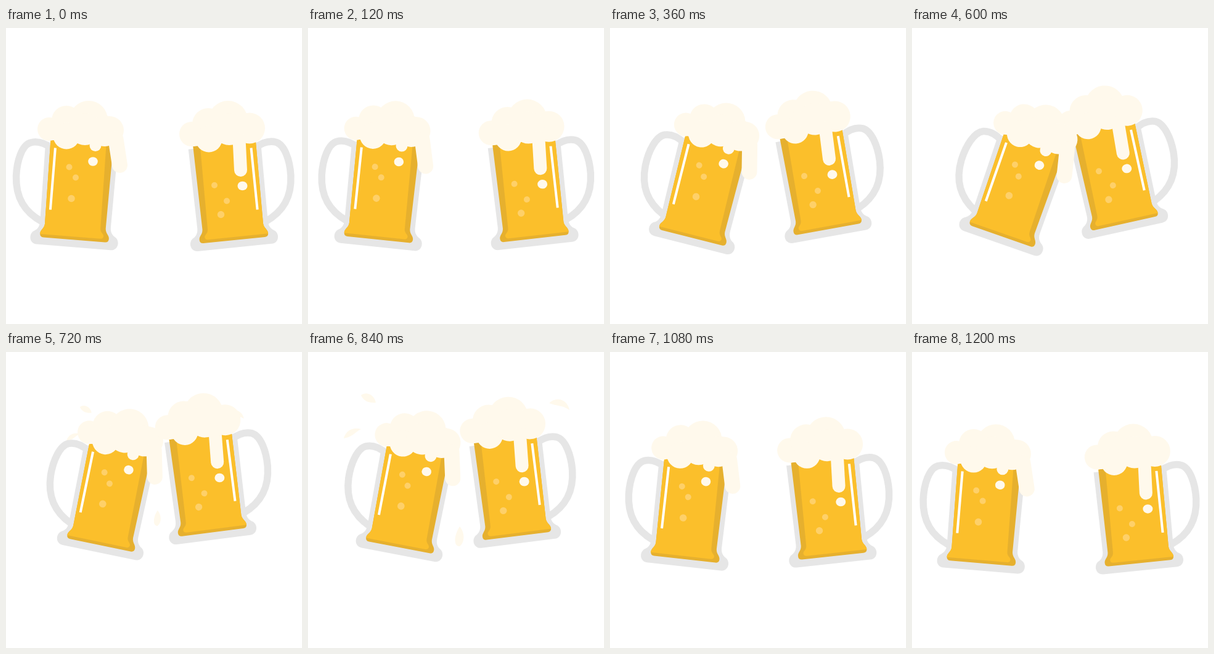
Write an HTML page that moves like this. It is 480 px wide and 480 px high and loops after 1.26 s.

```html
<!DOCTYPE html>
<html lang="en">
<head>
<meta charset="utf-8">
<title>Cheers</title>
<style>
  html, body { margin: 0; width: 100%; height: 100%; overflow: hidden; background: #fff; }
  svg { display: block; width: 100vw; height: 100vh; }
  .foam { fill: #fff9ec; }
  .drip { stroke: #fff9ec; stroke-linecap: round; }
  .bubbles { fill: #fed069; }
</style>
</head>
<body>
<svg viewBox="0 0 480 480">
  <defs>
    <!-- upright mug around its own centre, handle on the left -->
    <g id="body">
      <path fill="none" stroke="#e6e6e6" stroke-width="11.5"
        d="M-50-66C-62-73-74-75-84-71C-97-65-103-40-102-15C-100 20-84 42-54 55"/>
      <path fill="#e6e6e6" d="M-59-74H59L57.5 55C57.5 64 62 68 65 70C75 75 73 92 60 92H-60C-73 92-75 75-65 70C-62 68-57.5 64-57.5 55Z"/>
      <path fill="#e6b02e" d="M-51-78H51L49.5 58C50 66 56 68 56 74Q56 80 50 80H-50Q-56 80-56 74C-56 68-50 66-49.5 58Z"/>
      <path fill="#fbbf2b" d="M-51-78H39.5L41 58C41 65 46 66 47 70Q47 75 42 75H-56C-56 68-50 66-49.5 58Z"/>
      <path stroke="#fff" stroke-width="4" d="M-42.5-66V34.5"/>
    </g>
  </defs>

  <g id="splash" class="foam">
    <path d="M58 140C62 126 74 122 86 125C76 130 72 138 58 140"/>
    <path d="M86 70C94 64 107 68 110 82C100 83 90 80 86 70"/>
    <path d="M391 83C402 72 420 76 424 94C412 86 404 88 391 83"/>
    <path d="M246 283C254 292 255 308 246 315C236 316 236 298 246 283"/>
  </g>

  <g id="right">
    <use href="#body" transform="scale(-1 1)"/>
    <g transform="rotate(5.8) translate(-361.9 -264.4)">
      <g class="bubbles">
        <circle cx="338" cy="255" r="5"/><circle cx="358" cy="280.5" r="5"/><circle cx="348.5" cy="302.5" r="5.7"/>
      </g>
      <g class="foam">
        <circle cx="301" cy="172" r="20"/><circle cx="328" cy="156" r="26"/>
        <circle cx="360" cy="150" r="32"/><circle cx="395" cy="162.5" r="25"/>
        <circle cx="329" cy="180" r="21.5"/><circle cx="362" cy="164" r="26"/>
        <path class="drip" stroke-width="21" d="M378 180L380.5 230.5"/>
        <ellipse cx="383.5" cy="256" rx="8" ry="7.3"/>
      </g>
    </g>
  </g>

  <g id="left">
    <use href="#body"/>
    <g transform="rotate(-4.6) translate(-117 -263.7)">
      <g class="bubbles">
        <circle cx="102.5" cy="225.5" r="5"/><circle cx="113" cy="242.5" r="5"/><circle cx="106" cy="276.5" r="5.8"/>
      </g>
      <g class="foam">
        <circle cx="70" cy="164" r="19"/><circle cx="98" cy="150" r="24"/>
        <circle cx="134" cy="149" r="31"/><circle cx="168" cy="166" r="23"/>
        <circle cx="98" cy="175" r="21.5"/><circle cx="128" cy="164" r="26"/>
        <circle cx="160" cy="167" r="25"/><circle cx="145" cy="190.5" r="9.5"/>
        <path class="drip" stroke-width="25" d="M178 180L184.5 222.5"/>
        <ellipse cx="141" cy="216.5" rx="7.8" ry="7.3"/>
      </g>
    </g>
  </g>
</svg>
<script>
  const LOOP = 1260, STEP = 60;
  // each pose: step, x, y, angle
  const poses = {
    left:  [[0, 117, 263.7, 4.6], [10, 171.3, 262.2, 19.3], [12, 169.3, 235, 11.7], [21, 117, 263.7, 4.6]],
    right: [[0, 361.9, 264.4, -5.8], [10, 327.8, 238.8, -12.5], [12, 325, 213, -7.3], [21, 361.9, 264.4, -5.8]]
  };
  const byId = id => document.getElementById(id);
  const ease = p => (1 - Math.cos(Math.PI * p)) / 2;

  function poseAt(keys, step) {
    const i = keys.findIndex(key => key[0] > step);
    const from = keys[i - 1], to = keys[i];
    const p = ease((step - from[0]) / (to[0] - from[0]));
    return from.map((v, k) => v + (to[k] - v) * p);
  }

  function draw(now) {
    const step = Math.floor((now % LOOP) / STEP);
    for (const id in poses) {
      const [, x, y, angle] = poseAt(poses[id], step);
      byId(id).setAttribute('transform', `translate(${x} ${y}) rotate(${angle})`);
    }
    const flight = (step - 11) / 4;
    const scale = 0.6 + 0.427 * (1 - (1 - flight) ** 2);
    const splash = byId('splash');
    splash.setAttribute('visibility', flight >= 0 && flight < 1 ? 'visible' : 'hidden');
    splash.setAttribute('transform', `translate(245 160) scale(${scale}) translate(-245 -160)`);
    requestAnimationFrame(() => draw(performance.now() - start));
  }

  const start = performance.now();
  draw(0);
</script>
</body>
</html>
```
